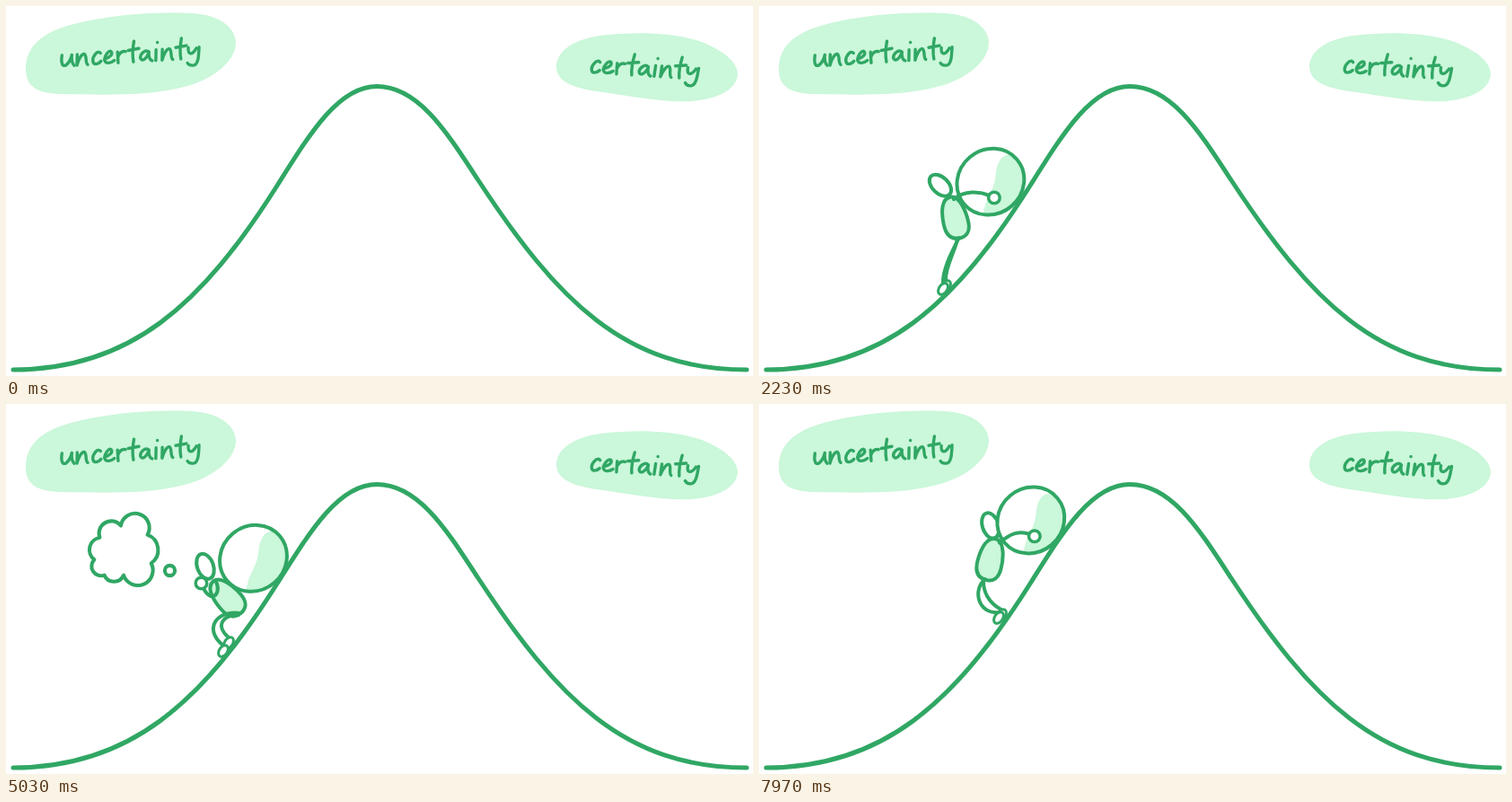
An HTML page for the animation above (8000 ms loop, 832 px wide and 412 px high).

```html
<!DOCTYPE html>
<html lang="en">
<head>
<meta charset="utf-8">
<title>Uphill</title>
<style>
  html, body { margin: 0; height: 100%; overflow: hidden; background: #fff; }
  svg { display: block; width: 832px; height: 412px; }
  svg * { stroke-linecap: round; stroke-linejoin: round; }
  .line { fill: none; stroke: #30a764; stroke-width: 4; }
  .white { fill: #fff; }
  .tint { fill: #cbf7da; }
  .hill { stroke-width: 5; }
  .hand { stroke-width: 3.5; }
  .foot { stroke-width: 3; }
  .pen { stroke-width: 3.4; }
  .mark { stroke: #bff0d0; }
</style>
</head>
<body>
<svg viewBox="0 0 832 412">
  <defs>
    <path id="tee" d="M48 -23C46 -15 45 -8 46 0M41 -13L53 -14.5"/>
    <path id="en" d="M79 -12L78 0C80 -6 84 -13 87 -12C90 -10 87 -2 90 0"/>
    <g id="word">
      <path d="M10 -12C7 -16 1 -9 1 -4C1 1 6 1 10 -3"/>
      <path d="M14 -5C20 -6 24 -10 22 -13C19 -15 14 -8 14 -4C15 1 21 0 25 -3"/>
      <path d="M29 -12L29 0M29 -6C31 -11 34 -13 38 -12"/>
      <use href="#tee"/>
      <path d="M64 -10C60 -14 54 -8 54 -4C55 1 61 -2 64 -10C63 -6 64 -1 67 0"/>
      <path d="M72 -12L71 0M74 -20v.1"/>
      <use href="#en"/>
      <use href="#tee" x="53"/>
      <path d="M108 -12C107 -5 111 -2 117 -11M120 -12C119 -2 118 8 112 8C109 8 107 7 106 5"/>
    </g>
    <path id="query" d="M-5 -8C-3 -12 5 -12 5 -7C5 -2 0 -3 0 3M1 10v.1"/>
  </defs>

  <path class="tint" d="M22 70C22 45 40 29 76 20C115 10 165 6 205 8C235 9 256 22 256 42C255 62 230 84 190 92C155 100 110 99 60 98C35 97 22 90 22 70Z"/>
  <g class="line pen" role="img" aria-label="uncertainty" transform="translate(96 65) rotate(-3.5)">
    <path d="M-33 -12C-35 -3 -33 1 -29 -1C-25 -4 -23 -8 -22 -12C-23 -6 -22 -2 -20 0"/>
    <use href="#en" x="-95"/>
    <use href="#word"/>
  </g>
  <path class="tint" d="M613 68C613 52 628 38 662 33C705 28 745 30 775 40C800 50 815 63 815 76C814 92 795 103 765 106C735 108 700 101 665 96C635 92 614 86 613 68Z"/>
  <g class="line pen" role="img" aria-label="certainty" transform="translate(651 74) rotate(3.5)">
    <use href="#word"/>
  </g>

  <g id="thought">
    <g id="cloud">
      <path class="line white" d="M105 149A13.4 13.4 0 0 1 128 136A15.6 15.6 0 1 1 157 146A17.6 17.6 0 0 1 161 177A16.4 16.4 0 1 1 131 190A11.4 11.4 0 0 1 110 190A10.4 10.4 0 0 1 99 173A13.5 13.5 0 0 1 105 149Z"/>
      <g id="query1"><use class="line mark" href="#query" transform="translate(119 167) rotate(-4)"/></g>
      <g id="query2"><use class="line mark" href="#query" transform="translate(143 157) rotate(-4)"/></g>
    </g>
    <circle id="dot" class="line white" r="5.5"/>
  </g>

  <g id="behind">
    <ellipse id="head" class="line white" rx="9" ry="14.5"/>
    <g id="ball">
      <ellipse class="white" rx="38.5" ry="35.8" transform="rotate(-40)"/>
      <path class="tint" d="M22 -30C12 -31 7 -20 6 -10C5 2 2 8 -2 16C-5 22 -7 28 -8 35C10 40 36 24 37 0C37 -14 30 -28 22 -30Z"/>
      <ellipse class="line" rx="38.5" ry="35.8" transform="rotate(-40)"/>
    </g>
  </g>

  <path class="line hill" d="M8 405C138 405 218 333 302 200C338 143 370 89.5 413 89.5C459 89.5 490 139 526 194C614 328 689 405 825 405"/>

  <g id="front">
    <g id="body"><path class="line tint" d="M0 -23.5C10 -23.5 14 -5 14 8C14 18 9 23.5 1 23.5C-9 23.5 -13.5 17 -13.5 5C-13.5 -10 -10 -23.5 0 -23.5Z"/></g>
    <path id="innerLeg" class="line"/>
    <path id="outerLeg" class="line"/>
    <ellipse id="leadFoot" class="line white foot" rx="4.5" ry="7"/>
    <ellipse id="rearFoot" class="line white foot" rx="4.5" ry="7"/>
    <path id="arm" class="line"/>
    <circle id="hand" class="line white hand" r="6.3"/>
  </g>
</svg>

<script>
const LOOP = 8000, FIRST = 500, STEP = 1000 / 15;
const el = {};
document.querySelectorAll('[id]').forEach(e => el[e.id] = e);

// Each push moves the ball and the feet on to the next spot of the slope.
const pushes = [510, 1843, 3177, 6443, 7777];
const balls = [[225, 252], [241.5, 224.5], [258.3, 195], [275.5, 171.8], [293, 144.5], [308, 121.5]];
const spots = [[189, 332], [208, 312], [232, 290], [248, 266], [270, 235], [288, 209]];

// Head x y angle, body x y angle, shoulder x y (all from the ball), then
// the curve handles of the outer and inner leg at hip and ankle.
const rest    = [-56, 11, -35, -29.5, 43.5, -40, -41.5, 26, -24, -4, -24, -20, -18, 0, -15, -13];
const heave   = [-45, 6, -18, -45, 43.5, 15, -35, 25, -14, 11, -24, 2, 0, 18, -8, -4];
const stretch = [-56, 4, -46, -40, 40, -12, -41, 19.5, -6, 12, -1, -16, -2, 13, -1, -16];
const stride  = [-57.5, 6.5, -35, -33.5, 40.5, -27, -42.5, 21.5, -28, -6, -14, -18, -16, 0, -8, -10];
const poses = [[0, rest], [195, heave], [395, stretch], [860, stride], [1130, rest]];

const ramp = (t, a, b) => Math.min(1, Math.max(0, (t - a) / (b - a)));
const smooth = (t, a, b) => { const u = ramp(t, a, b); return u * u * (3 - 2 * u); };
const mix = (a, b, u) => a.map((v, i) => v + (b[i] - v) * u);
const add = (a, b) => [a[0] + b[0], a[1] + b[1]];
const place = (e, p, angle = 0) => e.setAttribute('transform', `translate(${p}) rotate(${angle})`);
const curve = (e, a, b, c, d) => e.setAttribute('d', `M${a}C${b} ${c} ${d}`);
const scaleAt = (e, x, y, s) =>
  e.setAttribute('transform', `translate(${x} ${y}) scale(${Math.max(0, s)}) translate(${-x} ${-y})`);

function poseAt(t) {
  const i = poses.findIndex(([end]) => t < end);
  if (i < 0) return rest;
  const [a, from] = poses[i - 1], [b, to] = poses[i];
  return mix(from, to, smooth(t, a, b));
}

function drawFigure(t) {
  const shown = t >= FIRST;
  el.behind.style.display = el.front.style.display = shown ? '' : 'none';
  if (!shown) return;

  const n = Math.max(0, pushes.filter(s => s <= t).length - 1);
  const phase = Math.max(0, t - pushes[n]);
  const pose = poseAt(phase);
  const pair = i => [pose[i], pose[i + 1]];
  const think = smooth(t, 4220, 4630) - smooth(t, 5770, 6230);

  const ball = mix(balls[n], balls[n + 1], 1 - (1 - ramp(phase, 0, 460)) ** 2);
  place(el.ball, ball);
  place(el.head, add(add(ball, pair(0)), [2.5 * think, -2 * think]), pose[2] + 15 * think);

  const body = add(ball, pair(3)), tilt = pose[5] * Math.PI / 180;
  place(el.body, body, pose[5]);
  const hip = add(body, [-23 * Math.sin(tilt), 23 * Math.cos(tilt)]);

  const up = smooth(phase, 430, 900), lift = 6 * Math.sin(Math.PI * up);
  const lead = add(mix(spots[n], spots[n + 1], up), [-lift, -lift / 2]);
  const joined = add(spots[n], mix([-6, 9], [-3, 3], smooth(phase, 0, 200)));
  const rear = mix(joined, add(spots[n + 1], [-6, 9]), smooth(phase, 720, 1110));
  place(el.leadFoot, lead, 35);
  place(el.rearFoot, rear, 35);

  const leg = (e, top, foot, i) => {
    const ankle = add(foot, [0, -6]);
    curve(e, top, add(top, pair(i)), add(ankle, pair(i + 2)), ankle);
  };
  leg(el.outerLeg, hip, rear, 8);
  leg(el.innerLeg, add(hip, [-2, 2]), lead, 12);

  const shoulder = add(ball, pair(6));
  const grip = add(ball, [4, 17.8]);
  const hand = mix(grip, add(ball, [-58, 27.7]), think);
  const bend1 = mix(add(shoulder, [11, -9]), add(shoulder, [7, 15]), think);
  const bend2 = mix(add(grip, [-17, -9]), add(ball, [-49, 53]), think);
  curve(el.arm, shoulder, bend1, bend2, hand);
  place(el.hand, hand);
}

function drawThought(t) {
  const age = t - 4740;
  const shown = age > 0 && t < 6610;
  el.thought.style.display = shown ? '' : 'none';
  if (!shown) return;

  const spring = 1 - Math.exp(-age / 110) * Math.cos(2 * Math.PI * age / 420);
  const out = ramp(t, 6310, 6610);
  const shrink = out * out * (3.2 * out - 2.2);
  scaleAt(el.cloud, 131, 162.5, spring - shrink);

  const dotSize = spring * (1 - smooth(t, 5780, 6050));
  el.dot.setAttribute('transform', `translate(182.5 185.5) scale(${Math.max(0, dotSize)})`);
  el.query1.style.opacity = smooth(t, 5130, 5400);
  el.query2.style.opacity = smooth(t, 5340, 5630);
}

// The picture moves on at fifteen steps a second.
function draw(now) {
  const t = now % LOOP;
  const held = FIRST + Math.floor((t - FIRST + 4) / STEP) * STEP;
  drawFigure(held + 0.01);
  drawThought(held);
}

const start = performance.now();
function tick() {
  draw(performance.now() - start);
  requestAnimationFrame(tick);
}
tick();
</script>
</body>
</html>
```
